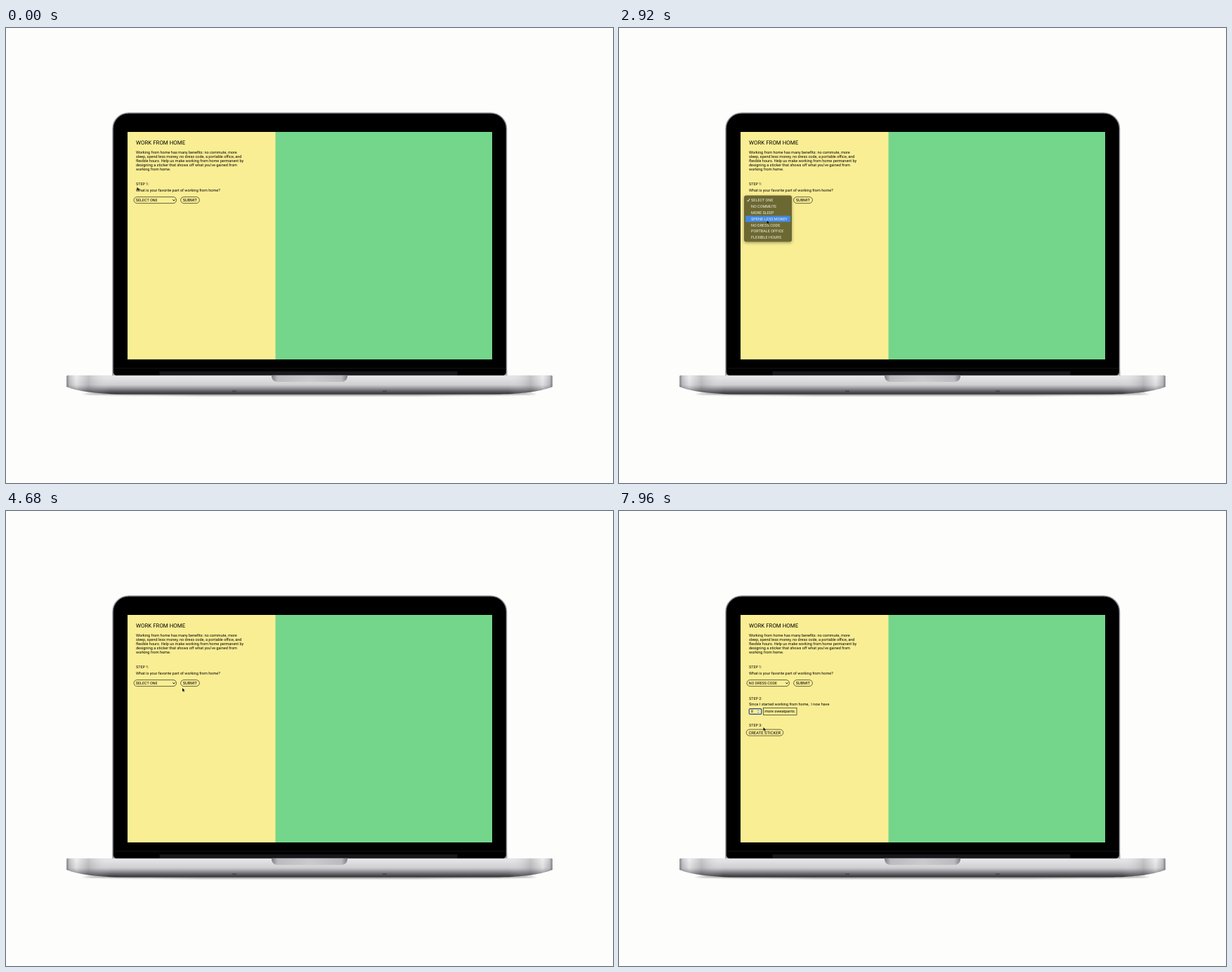
Write an HTML page that moves like this. It is 864 by 648 pixels and loops after 8000 ms.

```html
<!DOCTYPE html>
<html lang="en">
<head>
<meta charset="utf-8">
<title>Work from home</title>
<style>
  html, body { margin: 0; width: 100%; height: 100%; overflow: hidden; background: #fdfdfc; }
  svg { display: block; width: 864px; height: 648px; }
  text { font: 5.53px Roboto, sans-serif; text-rendering: geometricPrecision; white-space: pre; }
  .title { font-size: 7.9px; }
  .small { font-size: 5.4px; }
  .create { font-size: 5.9px; }
  .outline { fill: none; stroke: #1a1a10; stroke-width: .65; }
  #menu text { fill: #f4f2e4; }
</style>
</head>
<body>
<svg viewBox="0 0 864 648">
  <defs>
    <linearGradient id="metal" x2="0" y2="1">
      <stop offset="0" stop-color="#e2e2e4"/>
      <stop offset=".1" stop-color="#e4e4e6"/>
      <stop offset=".5" stop-color="#cfcfd2"/>
      <stop offset=".62" stop-color="#acacb0"/>
      <stop offset=".8" stop-color="#6c6c71"/>
      <stop offset="1" stop-color="#2c2c30"/>
    </linearGradient>
    <linearGradient id="ends">
      <stop offset="0" stop-color="#55565c" stop-opacity=".75"/>
      <stop offset=".006" stop-color="#8a8b90" stop-opacity=".35"/>
      <stop offset=".02" stop-color="#fff" stop-opacity=".3"/>
      <stop offset=".045" stop-color="#77787d" stop-opacity=".3"/>
      <stop offset=".09" stop-color="#fff" stop-opacity="0"/>
      <stop offset=".91" stop-color="#fff" stop-opacity="0"/>
      <stop offset=".955" stop-color="#77787d" stop-opacity=".3"/>
      <stop offset=".98" stop-color="#fff" stop-opacity=".3"/>
      <stop offset=".994" stop-color="#8a8b90" stop-opacity=".35"/>
      <stop offset="1" stop-color="#55565c" stop-opacity=".75"/>
    </linearGradient>
    <linearGradient id="notch">
      <stop offset="0" stop-color="#7f8086"/>
      <stop offset=".08" stop-color="#bcbcc0"/>
      <stop offset=".5" stop-color="#cbcbce"/>
      <stop offset=".92" stop-color="#bcbcc0"/>
      <stop offset="1" stop-color="#7f8086"/>
    </linearGradient>
    <filter id="soft" x="-10%" y="-200%" width="120%" height="500%"><feGaussianBlur stdDeviation="2 1"/></filter>
    <filter id="drop" x="-20%" y="-20%" width="140%" height="140%">
      <feDropShadow dx="0" dy="1.5" stdDeviation="2" flood-opacity=".35"/>
    </filter>
    <path id="base" d="M86.3 496.2q0-1.4 1.4-1.4H776.3q1.4 0 1.4 1.4V511C762 517 738 521.6 690 521.6H174C126 521.6 102 517 86.3 511Z"/>
  </defs>

  <!-- laptop -->
  <path d="M152 496V143.5a22.5 22.5 0 0 1 22.5-22.5H690a22.5 22.5 0 0 1 22.5 22.5V496Z" stroke="#94949b" stroke-width="1.5"/>
  <path d="M154 484.5H711" stroke="#17171a" stroke-width=".8"/>
  <path d="M151.3 487q1 6 5 8h-5ZM713.3 487q-1 6-5 8h5Z" fill="#a5a5ab"/>
  <rect x="218.5" y="489" width="424" height="6" fill="#17171c"/>
  <ellipse cx="432" cy="521" rx="322" ry="2.6" fill="#444" opacity=".6" filter="url(#soft)"/>
  <use href="#base" fill="url(#metal)"/>
  <use href="#base" fill="url(#ends)"/>
  <path d="M378 494.8h108v1.5q-1 7.7-9 7.7h-90q-8 0-9-7.7Z" fill="url(#notch)"/>
  <path d="M322 517.2h6M536 517.2h6" stroke="#3c3d42" stroke-width="1.2"/>

  <!-- page -->
  <rect x="173" y="148" width="211" height="324" fill="#faee94"/>
  <rect x="383.5" y="148" width="308.5" height="324" fill="#74d68a"/>
  <text class="title" x="185" y="165.8">WORK FROM HOME</text>
  <g id="intro"></g>
  <text class="small" x="185" y="224.4">STEP 1:</text>
  <text x="185" y="232.9">What is your favorite part of working from home?</text>
  <rect class="outline" x="182" y="240.6" width="60.5" height="9" rx="4.5"/>
  <text id="choice" class="small" x="184.8" y="247.1"></text>
  <path class="outline" d="M237.2 244.3l1.8 1.8 1.8-1.8" style="stroke-width:1"/>
  <rect class="outline" x="248.6" y="240.6" width="26.8" height="9" rx="4.5"/>
  <text x="251.7" y="247.2" style="font-size:5.65px">SUBMIT</text>

  <g id="steps">
    <text class="small" x="185" y="268.6">STEP 2:</text>
    <text x="185" y="277.4">Since I started working from home,  I now have</text>
    <rect class="outline" id="field" x="185.2" y="281.6" width="17.6" height="7.8"/>
    <g id="focus">
      <rect x="185.2" y="281.6" width="17.6" height="7.8" rx="1.5" fill="none" stroke="#2d4a86" stroke-width="1.2"/>
      <text id="count" x="188" y="287.4" style="font-size:5px"></text>
      <rect x="196.2" y="282.7" width="4" height="5.8" rx="1.2" fill="#f4efd0"/>
      <path d="M197 284.9l1.2-1.4 1.2 1.4M197 286.3l1.2 1.4 1.2-1.4" fill="none" stroke="#444" stroke-width=".6"/>
    </g>
    <rect class="outline" x="205.4" y="280.6" width="47.6" height="9.8"/>
    <text x="207.2" y="287.4">more sweatpants.</text>
    <text class="small" x="185" y="307">STEP 3:</text>
    <rect class="outline" x="181.2" y="311.1" width="52.6" height="9" rx="4.5"/>
    <text class="create" x="184.4" y="317.6">CREATE STICKER</text>
  </g>

  <g id="menu">
    <rect x="178" y="238.6" width="68" height="66" rx="3" fill="#6c6731" filter="url(#drop)"/>
    <rect id="hover" x="180" width="64" height="8.8" rx="1.2" fill="#4289e2"/>
    <path d="M182.4 245.4l1.3 1.7 2.4-4" fill="none" stroke="#fff" stroke-width=".9"/>
  </g>
  <path id="cursor" d="M0 0V5.2L1.2 4.1 2 6 2.9 5.6 2.1 3.8H3.7Z" fill="#000" stroke="#fff" stroke-opacity=".5" stroke-width=".3"/>
</svg>
<script>
const LOOP = 8000, ROW = 8.83, ROWS_TOP = 240.9;
const OPEN = 840, FADE = 4460, CLOSED = 4660, CHOSEN = 4720;
const SUBMITTED = 5240, FOCUSED = 6880, COUNT_FROM = 7040, COUNT_STEP = 75, COUNT_MAX = 8;

// time, x, y of the pointer tip
const pointer = [
  [0, 186.5, 226.5], [700, 208, 243], [1100, 208, 244], [1400, 208, 253],
  [1840, 207.5, 263], [2300, 207, 264], [2920, 210.5, 274], [3300, 209, 279],
  [4480, 208.5, 277.5], [4680, 251, 252], [5080, 258, 245], [5300, 258, 245.5],
  [5840, 252, 257], [6000, 250, 259], [6740, 197.5, 284], [7620, 197.5, 284],
  [7960, 205.5, 308], [8000, 206, 310]
];

const $ = id => document.getElementById(id);

function addText(parent, x, y, content) {
  const node = document.createElementNS("http://www.w3.org/2000/svg", "text");
  node.setAttribute("x", x);
  node.setAttribute("y", y);
  node.textContent = content;
  parent.append(node);
}

["Working from home has many benefits: no commute, more",
 "sleep, spend less money, no dress code, a portable office, and",
 "flexible hours. Help us make working from home permanent by",
 "designing a sticker that shows off what you’ve gained from",
 "working from home."
].forEach((line, i) => addText($("intro"), 185, 178.9 + i * 6.03, line));

["SELECT ONE", "NO COMMUTE", "MORE SLEEP", "SPEND LESS MONEY",
 "NO DRESS CODE", "PORTBALE OFFICE", "FLEXIBLE HOURS"
].forEach((label, i) => addText($("menu"), 188, 247.2 + i * ROW, label));

function pointerAt(t) {
  const next = Math.max(1, pointer.findIndex(key => key[0] > t));
  const [t0, x0, y0] = pointer[next - 1], [t1, x1, y1] = pointer[next];
  const u = (t - t0) / (t1 - t0), ease = u * u * (3 - 2 * u);
  return [x0 + (x1 - x0) * ease, y0 + (y1 - y0) * ease];
}

const show = (id, visible) => $(id).style.display = visible ? "" : "none";

function draw(t) {
  const [x, y] = pointerAt(t);
  $("cursor").setAttribute("transform", `translate(${x} ${y})`);

  show("menu", t >= OPEN && t < CLOSED);
  $("menu").style.opacity = Math.min(1, Math.max(0, (CLOSED - t) / (CLOSED - FADE)));
  const row = t >= FADE ? 4 : Math.max(0, Math.floor((y - ROWS_TOP) / ROW));
  $("hover").setAttribute("y", ROWS_TOP + row * ROW);
  $("choice").textContent = t < CHOSEN ? "SELECT ONE" : "NO DRESS CODE";

  show("steps", t >= SUBMITTED);
  show("field", t < FOCUSED);
  show("focus", t >= FOCUSED);
  const count = Math.min(COUNT_MAX, Math.floor((t - COUNT_FROM) / COUNT_STEP) + 1);
  $("count").textContent = count > 0 ? count : "";
}

const start = performance.now();
function tick() {
  draw((performance.now() - start) % LOOP);
  requestAnimationFrame(tick);
}
tick();
</script>
</body>
</html>
```
